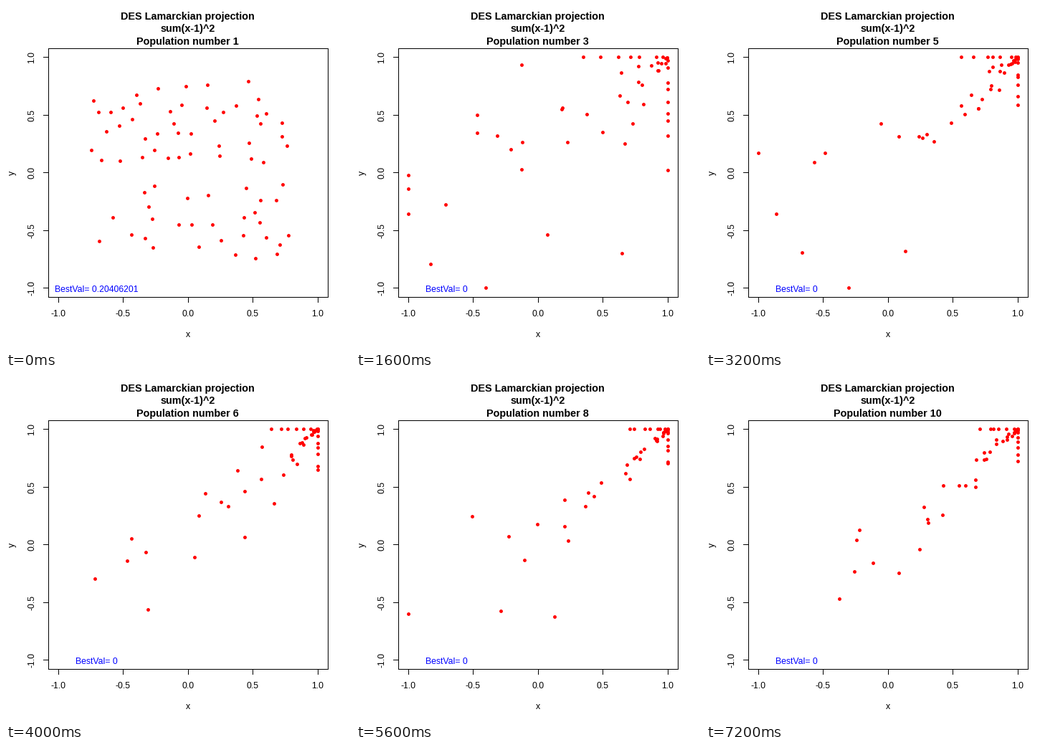
Write a matplotlib script that moves like this. It is 480 px wide and 480 px high and loops after 8000 ms.

```python
import numpy as np
import matplotlib.pyplot as plt
from matplotlib.animation import FuncAnimation
from matplotlib.collections import EllipseCollection

SIZE, DPI = 480, 80
PX = 72 / DPI  # points per pixel
STEP_MS = 800
GENERATIONS = 10
FONT = "Liberation Sans"


def to_px(points):
    """Data coordinates to whole stage pixels."""
    return np.floor(np.array([254.4, 232.8])
                    + np.asarray(points) * [180.89, -160.89])


def first_population(rng, count=74, gap=.07):
    """Uniform points that keep a small distance from each other."""
    pts = np.empty((0, 2))
    while len(pts) < count:
        p = rng.uniform(-.8, .8, 2)
        if not len(pts) or np.hypot(*(pts - p).T).min() > gap:
            pts = np.vstack([pts, p])
    return pts


def even(rng, count):
    """Random values spread evenly over 0..1."""
    return (np.arange(count) + rng.random(count)) / count


def later_population(rng, n, count=38, pinned=7):
    """A cloud that tightens around the optimum at (1, 1) with each step."""
    # Distance to the optimum; scatter grows with that distance.
    reach = 1.35 + 1.1 / n
    power = min(.65 + .35 * n, 2.7)
    dist = reach * even(rng, count) ** power
    noise = rng.normal(0, .1 + .9 / n, (count, 2))
    cloud = 1 - dist[:, None] * (1 + noise)

    # Individuals stopped at the upper, right and left bounds.
    span = .15 + 1.6 / n
    top = [(1 - span * u ** 1.3, 1) for u in even(rng, pinned)]
    right = [(1, 1 - span * u ** 1.3) for u in even(rng, pinned)]
    left = [(-1, rng.uniform(-1, .5)) for _ in range(10 // n - 1)]
    return np.clip(np.vstack([cloud, top, right] + [left] * bool(left)), -1, 1)


def population(n):
    rng = np.random.default_rng(40 + n)
    pts = first_population(rng) if n == 1 else later_population(rng, n)
    return to_px(pts) + .5


POPULATIONS = [population(n) for n in range(1, GENERATIONS + 1)]

fig = plt.figure(figsize=(SIZE / DPI, SIZE / DPI), dpi=DPI, facecolor="white")
ax = fig.add_axes([0, 0, 1, 1])
ax.set_xlim(0, SIZE)
ax.set_ylim(SIZE, 0)
ax.axis("off")


def line(xs, ys):
    ax.plot(xs, ys, color="black", lw=PX, antialiased=False,
            solid_capstyle="projecting")


def label(x, y, text, size=12.2, **style):
    style = {"ha": "center", "va": "baseline", **style}
    return ax.text(x, y, text, fontsize=size * PX, family=FONT, **style)


def side_label(x, y, text):
    label(x, y, text, ha="right", va="center", rotation=90)


line([59, 449, 449, 59, 59], [59, 59, 406, 406, 59])
for v in np.linspace(-1, 1, 5):
    x, y = to_px((v, v))
    line([x, x], [406, 413])
    line([52, 59], [y, y])
    label(x - .3, 433, f"{v:.1f}")
    side_label(42.5, y + .5, f"{v:.1f}")
label(253.5, 462, "x")
side_label(14.5, 232.5, "y")

TITLE = dict(size=14.35, weight="bold")
label(253.7, 19, "DES Lamarckian projection", **TITLE)
label(253.7, 36, "sum(x-1)^2", **TITLE)
heading = label(253.7, 54, "", **TITLE)
best = label(126.3, 399, "", color="blue", zorder=4)

dots = EllipseCollection([4.9], [4.9], [0], units="xy",
                         offsets=POPULATIONS[0], offset_transform=ax.transData,
                         facecolors="red", edgecolors="none", linewidths=0,
                         zorder=3)
ax.add_collection(dots, autolim=False)


def draw(i):
    dots.set_offsets(POPULATIONS[i])
    heading.set_text(f"Population number {i + 1}")
    best.set_text("BestVal= " + ("0.20406201" if i == 0 else "0"))
    return dots, heading, best


anim = FuncAnimation(fig, draw, frames=GENERATIONS, interval=STEP_MS,
                     repeat=True, repeat_delay=0, blit=False)
plt.show()
```
